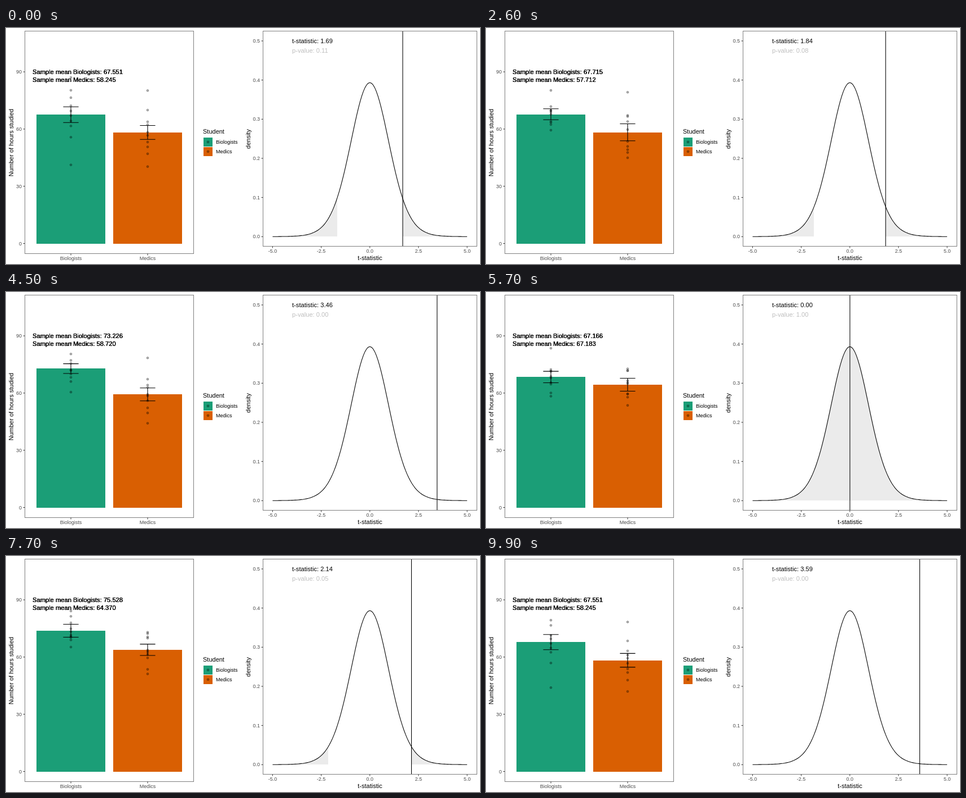
Animation of 840 by 420 pixels, one loop 10000 ms. Source, as an HTML page:

```html
<!DOCTYPE html>
<html lang="en">
<head>
<meta charset="utf-8">
<title>Sampling and the t-test</title>
<style>
  html, body { margin: 0; width: 100%; height: 100%; overflow: hidden; background: #fff; }
  svg { display: block; width: 840px; height: 420px; font: 11px "Liberation Sans", Arial, sans-serif; }
  .tick { font-size: 9px; fill: #4d4d4d; }
  .key { font-size: 9px; }
  .note { font-size: 11.16px; }
  .axis { stroke: #333; fill: none; }
  .frame { stroke: #7f7f7f; fill: none; }
  .line { stroke: #000; stroke-width: 1.07; fill: none; }
  .block { shape-rendering: crispEdges; }
  .dot { fill: #000; stroke: #000; stroke-width: .94; fill-opacity: .3; stroke-opacity: .3; }
  .mid { text-anchor: middle; }
  .end { text-anchor: end; }
</style>
</head>
<body>
<svg id="stage" viewBox="0 0 840 420"></svg>
<script>
const svg = document.getElementById('stage');
const COLORS = ['#1b9e77', '#d95f02'];
const NAMES = ['Biologists', 'Medics'];
const CENTERS = [115, 251];
const STEP = 100, FRAMES = 100, PER_STATE = 10, SAMPLE = 10;

// Per draw: both sample means, then both standard errors
const DRAWS = [
  [67.551, 58.245, 4.12, 3.65],
  [74.111, 58.688, 1.95, 3.46],
  [67.715, 57.712, 2.85, 4.63],
  [67.895, 60.082, 2.98, 3.95],
  [73.226, 58.720, 2.50, 3.37],
  [67.166, 67.183, 3.60, 3.80],
  [69.662, 61.571, 2.40, 2.99],
  [75.528, 64.370, 3.98, 3.37],
  [72.118, 63.224, 2.80, 2.59],
  [72.030, 59.050, 2.10, 2.94]
];

const hoursY = h => 383.5 - 3.394 * h;
const tX = t => 644.8 + 34.47 * t;
const densY = d => 371.3 - 696.6 * d;
const density = t => 0.3934 * Math.pow(1 + t * t / 18, -9.5);
const sine = u => (1 - Math.cos(Math.PI * u)) / 2;
const mix = (a, b, p) => a + (b - a) * p;
const sum = list => list.reduce((a, b) => a + b, 0);
const times = (n, fn) => Array.from({ length: n }, (_, i) => fn(i));

function set(el, attrs) {
  for (const k in attrs) el.setAttribute(k, attrs[k]);
}
function add(tag, attrs, text) {
  const el = document.createElementNS('http://www.w3.org/2000/svg', tag);
  set(el, attrs);
  if (text !== undefined) el.textContent = text;
  return svg.appendChild(el);
}
const label = (x, y, text, cls, extra) => add('text', { x, y, class: cls || '', ...extra }, text);
const path = (d, cls) => add('path', { d, class: cls });
const sideTitle = (x, y, text) =>
  label(0, 0, text, 'mid', { transform: `translate(${x} ${y}) rotate(-90)` });
const panel = (x, y, width, height) => add('rect', { x, y, width, height, class: 'frame' });

let seed = 11;
function rand() {
  seed = (seed * 16807) % 2147483647;
  return seed / 2147483647;
}

// Bell-shaped sample in random order with exactly this mean and standard error
function sample(mean, se) {
  const raw = times(SAMPLE, i => {
    const q = (i + 0.2 + 0.6 * rand()) / SAMPLE;
    return { z: Math.log(q / (1 - q)), order: rand() };
  }).sort((a, b) => a.order - b.order).map(d => d.z);
  const center = sum(raw) / SAMPLE;
  const sd = Math.sqrt(sum(raw.map(z => (z - center) ** 2)) / (SAMPLE - 1));
  return raw.map(z => mean + (z - center) / sd * se * Math.sqrt(SAMPLE));
}
const dots = DRAWS.map(d => CENTERS.map((_, g) => sample(d[g], d[g + 2])));

// Two-sided p-value by midpoint integration
function pValue(t) {
  const n = 400, w = t / n;
  return 1 - 2 * w * sum(times(n, i => density((i + 0.5) * w)));
}
const tests = DRAWS.map(([a, b, sa, sb]) => {
  const t = Math.abs(a - b) / Math.hypot(sa, sb);
  return { t, p: pValue(t) };
});

// Left panel
const bars = COLORS.map((fill, g) =>
  add('rect', { x: CENTERS[g] - 61, width: 122, fill, class: 'block' }));
const circles = CENTERS.map(cx =>
  times(SAMPLE, () => add('circle', { cx, r: 1.9, class: 'dot' })));
const whiskers = CENTERS.map(() => path('', 'line'));
const notes = [82, 96].map(y => times(3, () => label(47, y, '', 'note')));
panel(33.5, 5.5, 299, 396);
for (let h = 0; h <= 90; h += 30) {
  const y = hoursY(h);
  label(28, y + 3.1, h, 'tick end');
  path(`M30.5 ${y}h3`, 'axis');
}
CENTERS.forEach((x, g) => {
  label(x, 413, NAMES[g], 'tick mid');
  path(`M${x} 401.5v3`, 'axis');
});
sideTitle(13, 204, 'Number of hours studied');

// Legend
label(349, 188, 'Student');
COLORS.forEach((fill, g) => {
  const y = 195 + g * 17;
  add('rect', { x: 350, y, width: 16, height: 16, fill, class: 'block' });
  add('circle', { cx: 358, cy: y + 7.8, r: 1.9, class: 'dot' });
  label(372, y + 11, NAMES[g], 'key');
});

// Right panel
function curve(from, to) {
  return 'M' + times(121, i => {
    const t = mix(from, to, i / 120);
    return tX(t).toFixed(2) + ' ' + densY(density(t)).toFixed(2);
  }).join('L');
}
const tail = (a, b) => curve(a, b) + `L${tX(b)} ${densY(0)}L${tX(a)} ${densY(0)}Z`;
const shade = add('path', { fill: '#ebebeb', class: 'block' });
path(curve(-5, 5), 'line');
const marker = path('', 'line');
const tNote = label(507, 27, '', 'note');
const pNote = label(507, 44, '', 'note', { fill: '#bebebe' });
panel(455.5, 5.5, 379, 383);
for (let i = 0; i <= 5; i++) {
  const y = densY(i / 10);
  label(450, y + 3.1, (i / 10).toFixed(1), 'tick end');
  path(`M452.5 ${y}h3`, 'axis');
}
for (let t = -5; t <= 5; t += 2.5) {
  label(tX(t), 400, t.toFixed(1), 'tick mid');
  path(`M${tX(t)} 388.5v3`, 'axis');
}
label(645, 413, 't-statistic', 'mid');
sideTitle(433, 197.5, 'density');

function drawSample(n) {
  const k = Math.floor(n / PER_STATE), next = (k + 1) % DRAWS.length;
  const start = k ? 4 : 3;
  const u = Math.max(0, (n % PER_STATE - start) / (PER_STATE - start));
  const p = sine(u), from = DRAWS[k], to = DRAWS[next];
  const shown = u > 0.5 ? to : from;
  CENTERS.forEach((x, g) => {
    const mean = mix(from[g], to[g], p), se = mix(from[g + 2], to[g + 2], p);
    const y = hoursY(mean), top = hoursY(mean + se), low = hoursY(mean - se);
    set(bars[g], { y, height: 384 - y });
    set(whiskers[g], { d: `M${x - 13.6} ${top}h27.2M${x} ${top}V${low}M${x - 13.6} ${low}h27.2` });
    circles[g].forEach((c, i) => set(c, { cy: hoursY(mix(dots[k][g][i], dots[next][g][i], p)) }));
    notes[g].forEach(el => el.textContent = `Sample mean ${NAMES[g]}: ${shown[g].toFixed(3)}`);
  });
}

function drawTest(n) {
  const { t, p } = tests[Math.floor(Math.max(0, n - 1) / PER_STATE)];
  set(shade, { d: tail(-5, -t) + tail(t, 5) });
  set(marker, { d: `M${tX(t)} 5V389` });
  tNote.textContent = 't-statistic: ' + t.toFixed(2);
  pNote.textContent = 'p-value: ' + p.toFixed(2);
}

let last = -1;
function tick() {
  const n = Math.floor(performance.now() / STEP) % FRAMES;
  if (n !== last) {
    drawSample(n);
    drawTest(n);
    last = n;
  }
  requestAnimationFrame(tick);
}
tick();
</script>
</body>
</html>
```
